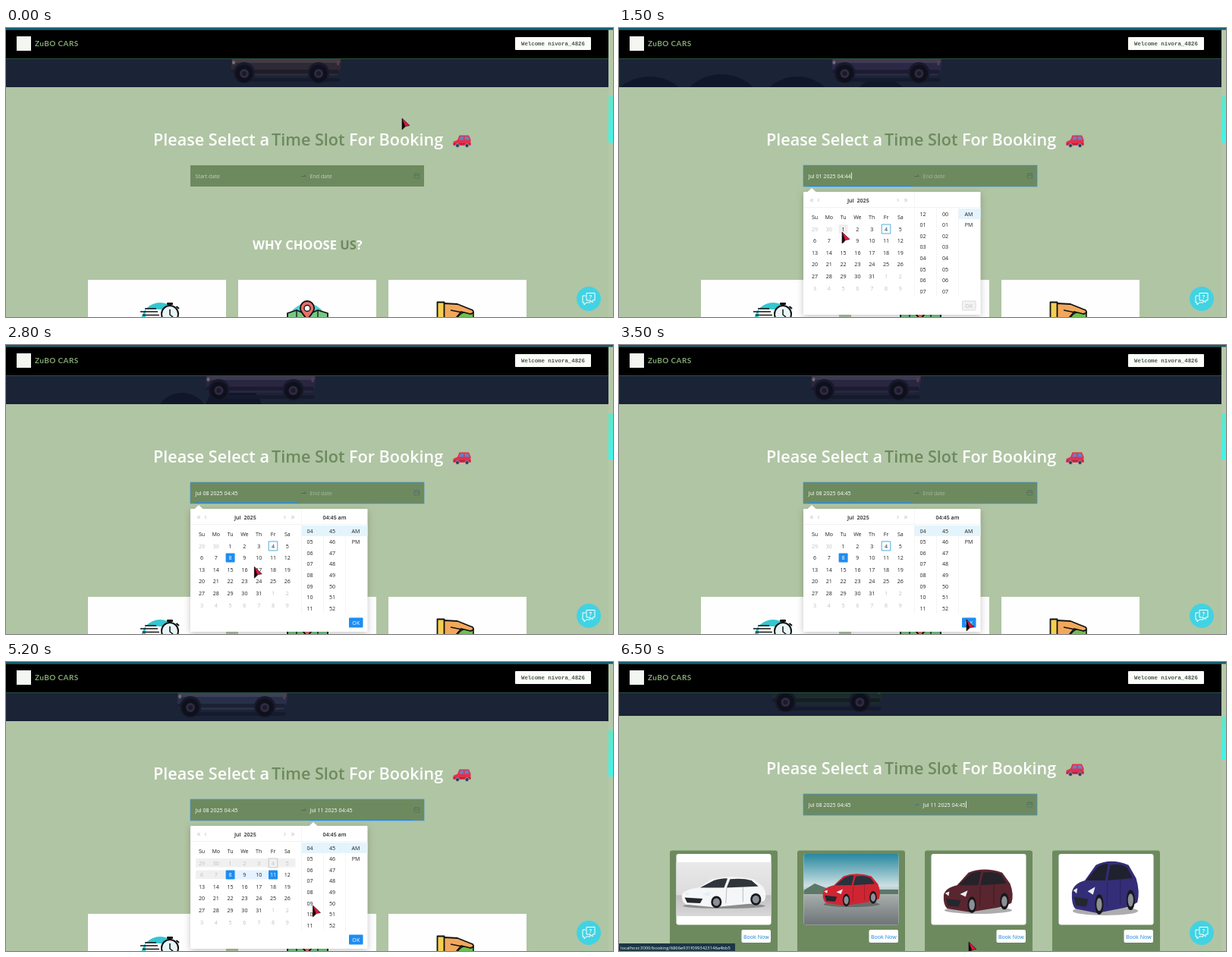
An HTML page with a canvas for the animation above (6.6 s loop, 800 by 381 pixels).

```html
<!DOCTYPE html>
<html lang="en">
<head>
<meta charset="utf-8">
<title>Time slot booking</title>
<style>
  html, body { margin: 0; width: 100%; height: 100%; overflow: hidden; background: #b0c4a4; }
  canvas { display: block; width: 800px; height: 381px; }
</style>
</head>
<body>
<canvas id="stage"></canvas>
<script>
const LOOP = 6600, STEP = 100;
const SAGE = '#b0c5a4', MOSS = '#6d8a5f', BLUE = '#1e8df0', INK = '#222', PALE = '#bfbfbf';
const SANS = '"Open Sans", "Noto Sans", sans-serif';

const canvas = document.getElementById('stage');
const ratio = window.devicePixelRatio || 1;
canvas.width = 800 * ratio;
canvas.height = 381 * ratio;
const c = canvas.getContext('2d');

function rect(x, y, w, h, fill, r = 0) {
  c.fillStyle = fill;
  c.beginPath();
  c.roundRect(x, y, w, h, r);
  c.fill();
}
function frame(x, y, w, h, color, lw = 1, r = 0) {
  c.strokeStyle = color;
  c.lineWidth = lw;
  c.beginPath();
  c.roundRect(x, y, w, h, r);
  c.stroke();
}
function disc(x, y, r, fill, stroke, lw = 1.5) {
  c.beginPath();
  c.arc(x, y, r, 0, 7);
  if (fill) { c.fillStyle = fill; c.fill(); }
  if (stroke) { c.strokeStyle = stroke; c.lineWidth = lw; c.stroke(); }
}
function oval(x, y, rx, ry, fill) {
  c.fillStyle = fill;
  c.beginPath();
  c.ellipse(x, y, rx, ry, 0, 0, 7);
  c.fill();
}
function shape(d, fill, stroke, lw = 1.5) {
  const p = new Path2D(d);
  if (fill) { c.fillStyle = fill; c.fill(p); }
  if (stroke) { c.strokeStyle = stroke; c.lineWidth = lw; c.lineJoin = 'round'; c.stroke(p); }
}
function text(s, x, y, size, fill, weight = 400, align = 'left', family = SANS) {
  c.font = `${weight} ${size}px ${family}`;
  c.textAlign = align;
  c.textBaseline = 'alphabetic';
  c.fillStyle = fill;
  c.fillText(s, x, y + size * 0.36);
  return c.measureText(s).width;
}
function at(x, y, sx, sy, draw) {
  c.save();
  c.translate(x, y);
  c.scale(sx, sy);
  draw();
  c.restore();
}

// pointer route: seconds, x, y
const ROUTE = [
  [0, 522, 119], [0.3, 505, 128], [0.8, 322, 194], [1, 318, 196], [1.4, 294, 269],
  [1.6, 294, 269], [2, 295, 275], [2.6, 295, 275], [3.3, 458, 362], [3.6, 458, 362],
  [4.2, 348, 273], [4.8, 348, 273], [5.6, 461, 369], [6.6, 461, 369]
];
function pointerAt(t) {
  let i = 1;
  while (t > ROUTE[i][0]) i++;
  const [a, ax, ay] = ROUTE[i - 1], [b, bx, by] = ROUTE[i];
  const u = (t - a) / (b - a), e = u * u * (3 - 2 * u);
  return [ax + (bx - ax) * e, ay + (by - ay) * e];
}

function stateAt(t) {
  const s = {
    open: t > 0.85 && t < 6.15, end: t > 3.55, picked: false, hover: 0,
    from: '', to: '', caret: false, cards: t > 6.15, scroll: t > 6.45 ? 7 : 0, okHover: false
  };
  if (t > 1.75) s.from = 'Jul 08 2025 04:45';
  else if (t > 1.35) s.from = 'Jul 01 2025 04:44';
  if (t > 4.15) s.to = 'Jul 11 2025 04:45';
  s.picked = (t > 2.35 && !s.end) || t > 4.65;
  if (!s.picked) s.hover = s.end ? (t > 4.15 ? 11 : 0) : t > 1.75 ? 8 : t > 1.35 ? 1 : 0;
  s.caret = (s.open && !s.picked) || s.cards;
  s.okHover = s.picked && (s.end ? t > 5.45 : t > 3.2);
  return s;
}

function bush(x, y, r) {
  disc(x, y + r, r, '#10172a');
}

function hero(t) {
  c.save();
  c.beginPath();
  c.rect(0, 40, 794, 38);
  c.clip();
  rect(0, 36, 794, 42, '#1b2336');
  const pass = (x, t0) => x - 700 * (t - t0);
  for (const [x, y, r] of [[40, 64, 60], [135, 61, 60], [235, 64, 55], [345, 66, 40]]) bush(pass(x, 1.5), y, r);
  bush(pass(722, 2.1), 63, 36);
  bush(pass(790, 2.1), 50, 38);
  bush(pass(370, 4.4), 65, 34);

  at(312 - 10 * t - 0.7 * t * t, 0, 1, 1, () => {
    const tones = ['#2e2934', '#2b2845', '#2d2a45', '#292641', '#262943', '#283049', '#1c2b2d'];
    const stops = [0.7, 1.8, 2.8, 3.95, 5.2, 6.25, 7];
    const body = tones[stops.findIndex(s => t < s)];
    rect(-8, 66, 136, 5, '#151b2d', 3);
    shape('M-15 36H129Q131 50 127 59Q126 63 119 63H-9Q-15 62-15 56Z', body);
    rect(-14, 41, 143, 5, 'rgba(190,170,165,.14)');
    rect(-15, 55, 142, 5, 'rgba(14,16,30,.5)', 2);
    rect(-14, 43, 4, 5, '#77696b', 2);
    rect(124, 43, 3, 6, '#5d3d49', 1);
    for (const x of [2, 100]) {
      disc(x, 59, 14, '#181a2c');
      disc(x, 60, 11.5, '#0e101c');
      disc(x, 60, 6, '#2f2a40');
      disc(x, 60, 3, '#1b1a2a');
    }
  });
  c.restore();
}

function header() {
  rect(0, 0, 800, 2.5, '#125b70');
  rect(0, 2.5, 794, 38, '#000');
  rect(0, 40, 794, 1, '#28523f');
  rect(14, 11, 19, 19, '#f4f6f1');
  c.letterSpacing = '0.4px';
  text('ZuBO CARS', 38, 20.5, 10, '#84a873', 700, 'left', '"Lato", sans-serif');
  c.letterSpacing = '0px';
  rect(671, 12, 100, 17, '#fbfdf9', 1);
  text('Welcome nivora_4826', 679, 20, 7.37, '#4a564a', 700, 'left', '"Liberation Mono", monospace');
}

function redCar() {
  shape('M589.500 150L595 147.500L597.500 141.500H610L612.500 147V155H589.500Z', '#e3304c');
  shape('M597 147.500L599 143H603V147.500ZM604.500 147.500V143H609L611 147.500Z', '#6a7fc4');
  rect(589.5, 152, 23, 1.5, '#a82043');
  for (const x of [595, 607.5]) disc(x, 155, 2.5, '#343b56', '#b7c0cc', 0.7);
}

function field(s) {
  rect(243, 181, 308, 28, MOSS);
  const focus = s.open || s.cards;
  if (focus) {
    frame(242.5, 180.5, 309, 29, 'rgba(70,150,215,.2)', 1, 1);
    frame(243.25, 181.25, 307.5, 27.5, '#4a8fbb', 0.7);
  }
  if (s.open) rect(s.end ? 400 : 249, 207.5, 136, 1.5, BLUE);
  const put = (value, hint, x, active) => {
    const w = text(value || hint, x, 195, 7.1, value ? '#fff' : focus ? '#a8b89d' : '#c4d0bb');
    if (active && s.caret) rect(x + (value ? w + 0.5 : 0), 190.5, 0.8, 9, '#fff');
  };
  put(s.from, 'Start date', 249.5, !s.end);
  put(s.to, 'End date', 400.5, s.end);
  shape('M389 195.500H395M393 193.500L395.500 195.500', null, s.cards ? '#3d6f9a' : '#4e6548', 0.8);
  frame(538, 192, 6.5, 6, '#526f68', 0.8);
  shape('M538 194.500H544.500M540 191V193M543 191V193', null, '#526f68', 0.8);
}

function days(s) {
  'Su Mo Tu We Th Fr Sa'.split(' ').forEach((d, i) => text(d, 258 + i * 18.8, 249.5, 7.1, INK, 400, 'center'));
  if (s.end) {
    rect(250, 259, 131.5, 11.5, '#f0f0f0');
    rect(250, 274.5, 39, 11.5, '#f0f0f0');
    if (s.picked) rect(302, 274.5, 44, 12, '#e4f3ff');
    else if (s.hover) {
      c.setLineDash([2, 1.5]);
      shape('M302 274.500H346M302 286.500H346', null, '#7fbdf5', 0.7);
      c.setLineDash([]);
    }
  }
  for (let i = 0; i < 42; i++) {
    const n = i - 1, inside = n > 0 && n < 32;
    const label = n < 1 ? 29 + i : n > 31 ? n - 31 : n;
    const x = 258 + (i % 7) * 18.8, y = 265 + Math.floor(i / 7) * 15.6;
    const chosen = inside && ((n === 8 && (s.end || s.picked)) || (n === 11 && s.end && (s.picked || s.hover)));
    const off = !inside || (s.end && n < 8);
    if (chosen) rect(x - 6, y - 6, 12, 12, BLUE, 1);
    else if (inside && n === s.hover) rect(x - 6, y - 6, 12, 12, '#eeeeee', 1);
    if (inside && n === 4) frame(x - 5.8, y - 6, 11.6, 12, s.end ? '#c4c4c4' : '#39a5df', 0.9);
    text(String(label), x, y, 7.1, chosen ? '#fff' : off ? PALE : INK, 400, 'center');
  }
}

function times(s) {
  const set = s.picked || s.end;
  const h = set ? 4 : 12, m = set ? 45 : 0;
  const two = n => String(n).padStart(2, '0');
  rect(s.picked ? 389.5 : 447.5, 238, s.picked ? 87 : 29, 14, '#e4f4fc');
  for (let i = 0; i < 8; i++) {
    const y = 245 + i * 14.6;
    text(two((h + i - 1) % 12 + 1), 400.5, y, 7.1, INK, 400, 'center');
    text(two(m + i), 430, y, 7.1, INK, 400, 'center');
    if (i < 2) text(i ? 'PM' : 'AM', 461, y, 7.1, INK, 400, 'center');
  }
  if (s.picked) text('04:45 am', 433, 227, 7.1, INK, 600, 'center');
}

function panel(s) {
  const tip = s.end ? 405 : 254;
  c.save();
  c.shadowColor = 'rgba(0,0,0,.22)';
  c.shadowBlur = 8 * ratio;
  c.shadowOffsetY = 2 * ratio;
  rect(243, 216, 233.5, 162, '#fff', 1);
  c.restore();
  shape(`M${tip - 6} 216.500L${tip} 211L${tip + 6} 216.500Z`, '#fff');
  rect(243, 236, 233.5, 0.7, '#eeeeee');
  for (const x of [389, 418, 447]) rect(x, x === 389 ? 216 : 236, 0.7, x === 389 ? 138 : 118, '#f1f1f1');
  [['«', 254], ['‹', 263], ['›', 367.5], ['»', 378]].forEach(([k, x]) => text(k, x, 226.5, 10, '#c3c3c3', 400, 'center'));
  text('Jul', 301, 227, 7.1, INK, 600);
  text('2025', 313.5, 227, 7.1, INK, 600);
  days(s);
  times(s);
  const on = s.picked;
  rect(452, 359.5, 18.5, 13, on ? (s.okHover && s.end ? '#1569b4' : BLUE) : '#f3f3f3', 1);
  if (!on) frame(452.5, 360, 17.5, 12, '#d9d9d9', 0.8, 1);
  text('OK', 461.3, 366, 7.1, on ? '#fff' : '#bcbcbc', 400, 'center');
}

function features() {
  const w = text('WHY CHOOSE ', 325, 286, 16.5, '#fff', 700);
  const u = text('US', 325 + w, 286, 16.5, MOSS, 700);
  text('?', 325 + w + u, 286, 16.5, '#fff', 700);
  for (let i = 0; i < 3; i++) rect(108 + i * 198, 332, 182, 60, '#fefefe');

  disc(203, 387, 25, '#35c6cf');
  rect(184, 371, 22, 14, '#fff');
  shape('M177 374H200M180 378.500H202M183 370H198', null, '#111', 1.4);
  rect(212, 362, 8, 3, '#111', 1);
  rect(214.5, 364, 3, 4, '#111');
  shape('M224.500 367L228 370', null, '#111', 2);
  disc(216, 377, 11, '#e9f5f7', '#111', 2);
  shape('M216 371V378L220 381', null, '#111', 1.5);

  disc(397, 388, 25, '#54cfd2');
  shape('M371 390V376L383 372L397 378L411 372L424 376V390Z', '#76c883', '#111', 1.8);
  shape('M383 372V390M411 372V390', null, '#111', 1.3);
  shape('M384 384Q394 378 400 390', null, '#f3d35c', 2.5);
  shape('M397 384Q387 373 388 369A9 9 0 0 1 406 369Q407 373 397 384Z', '#e86f6b', '#111', 1.8);
  disc(397, 369.5, 4, '#fff', '#111', 1.4);

  shape('M596 380Q604 371 616 375V390H594Z', '#6cc04f', '#111', 1.6);
  shape('M577 363L595 364L615 372Q618 376 612 377L600 374L594 381L588 390H577Z', '#f2a85b', '#111', 1.8);
  shape('M586 372L601 375', null, '#111', 1.5);
  rect(568, 361, 9, 24, '#f5cf52');
  frame(568.5, 361.5, 9, 24, '#111', 1.8);
}

// three-quarter car in a unit of 100 by 50
function photoCar(x, y, w, h, paint, dark, roof) {
  at(x, y, w / 100, h / 50, () => {
    oval(50, 46, 48, 4, 'rgba(20,20,25,.35)');
    shape(`M1 29Q3 21 20 18L36 ${roof + 2}Q58 ${roof - 5} 84 ${roof + 2}L95 16Q101 28 97 38L86 42L38 48L6 44Q0 40 1 29Z`, paint);
    shape(`M22 18L38 ${roof + 4}Q48 ${roof} 54 ${roof + 1}L50 18Z`, dark);
    shape(`M53 18L57 ${roof + 2}Q72 ${roof} 82 ${roof + 4}L90 16Z`, dark);
    shape('M4 33L25 35L22 42L7 41Z', '#24272e');
    shape('M3 27L9 25L8 30ZM24 28L35 24L32 31Z', '#e6edf2');
    shape('M53 19L52 42M72 17V40', null, 'rgba(0,0,0,.3)', 0.8);
    for (const [wx, wy] of [[41, 40], [87, 36]]) {
      oval(wx, wy, 6.2, 9.2, '#17181c');
      oval(wx, wy, 4, 6, '#8b8f96');
    }
  });
}

function cards() {
  for (let i = 0; i < 4; i++) {
    const x = 67 + i * 168;
    rect(x, 255.5, 142, 150, MOSS, 3);
    rect(x + 8.5, 260, 125, 93.5, '#fff', 3);
    rect(x + 94.5, 360, 38.5, 17, '#fff', 2);
    text('Book Now', x + 113.8, 369, 7.1, '#1683dc', 400, 'center');
  }
  const wall = c.createLinearGradient(0, 271, 0, 342);
  wall.addColorStop(0, '#e9e9e9');
  wall.addColorStop(0.6, '#dcdcdc');
  wall.addColorStop(0.62, '#c0c0c0');
  wall.addColorStop(1, '#d8d8d8');
  rect(75.5, 271, 125, 71, wall);
  photoCar(82, 289, 113, 43, '#f5f6f7', '#30353c', 3);

  const sky = c.createLinearGradient(0, 260, 0, 353);
  sky.addColorStop(0, '#2787a0');
  sky.addColorStop(0.45, '#cbe0e2');
  sky.addColorStop(0.6, '#a3aaa8');
  sky.addColorStop(1, '#6f7578');
  rect(243.5, 260, 125, 93.5, sky, 3);
  shape('M243.500 308L258 299L278 307H368V313H243.500Z', '#5d7768');
  photoCar(268, 285, 77, 45, '#cf2532', '#26323d', 3);
  photoCar(427, 280, 93, 59, '#59252f', '#252229', 2);
  photoCar(596, 269, 90, 72, '#342d78', '#20212e', 2);
}

function chat() {
  disc(768, 357, 16, '#41d3e3');
  shape('M764 353H760V362H762V365L765 362H770V359', null, '#fff', 1);
  shape('M765 349.500H776V359H773V362L770 359H765Z', '#41d3e3', '#fff', 1);
  text('?', 770.5, 354.3, 7, '#fff', 700, 'center');
}

function pointer(t) {
  const [x, y] = pointerAt(t);
  at(x, y, 1, 1, () => {
    shape('M0 0L10 9.500L5 10.500L0 15Z', '#e0143c', '#160a10', 0.6);
    shape('M0 0L4 10.500L0 15Z', '#120a10');
  });
}

function scrollbar(s) {
  rect(794, 2.5, 6, 379, '#b5c9a9');
  const y = s.cards ? 72 : 90, h = s.cards ? 57 : 61;
  const g = c.createLinearGradient(0, y, 0, y + h);
  g.addColorStop(0, '#62e6c8');
  g.addColorStop(1, '#3ff5ea');
  rect(794, y, 6, h, g);
}

function draw(t) {
  const s = stateAt(t);
  c.setTransform(ratio, 0, 0, ratio, 0, 0);
  rect(0, 0, 800, 381, SAGE);
  at(0, -s.scroll, 1, 1, () => {
    hero(t);
    text('Please Select a', 194, 147, 21.6, '#fff', 600);
    text('Time Slot', 350, 147, 21.6, MOSS, 600);
    text('For Booking', 452, 147, 21.6, '#fff', 600);
    redCar();
    field(s);
    if (s.cards) cards();
    else features();
    if (s.open) panel(s);
  });
  scrollbar(s);
  header();
  chat();
  if (t > 6.25) {
    rect(0, 371, 153, 10, '#1b3644');
    text('localhost:3000/booking/6866e931f0993423146a4bb5', 2, 376.5, 5.85, '#fff');
  }
  pointer(t);
}

function tick() {
  const ms = performance.now() % LOOP;
  draw(Math.floor(ms / STEP) * STEP / 1000);
  requestAnimationFrame(tick);
}
tick();
</script>
</body>
</html>
```
